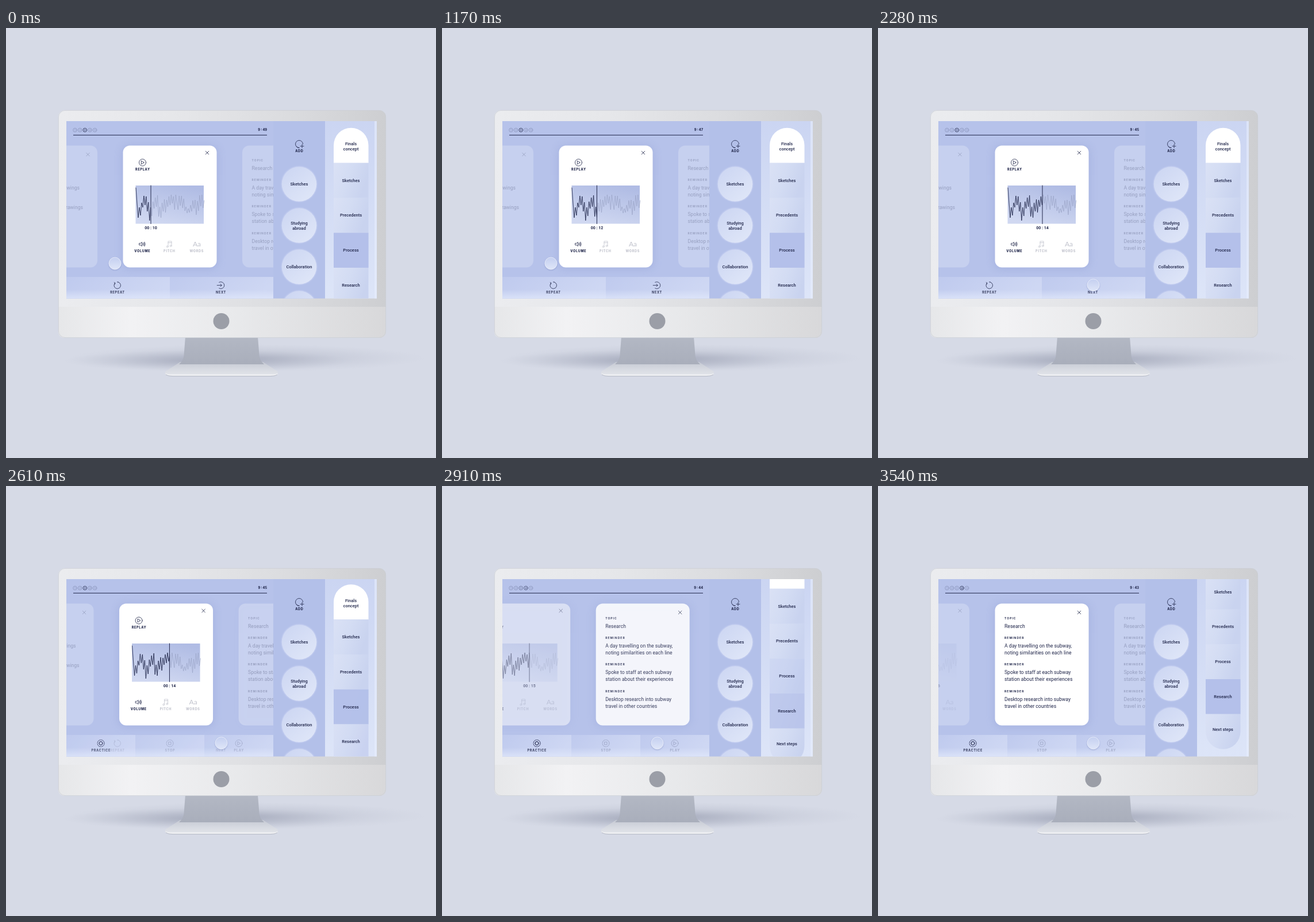
These frames come from a looping animation (748x748 px, 3.57 s). An HTML page:

```html
<!DOCTYPE html>
<html lang="en">
<head>
<meta charset="utf-8">
<title>Rehearsal cards</title>
<style>
  html, body { margin: 0; width: 100%; height: 100%; overflow: hidden; background: #d6dae6; }
  svg { display: block; width: 100vw; height: 100vh; }
  text { font-family: Roboto, sans-serif; fill: #20264a; }
  .body { font-size: 8.65px; }
  .item { font-size: 7.5px; font-weight: 500; text-anchor: middle; }
  .cap { font: 800 5.5px Inter, sans-serif; letter-spacing: .7px; text-anchor: middle; }
  .head { font: 700 5px Inter, sans-serif; letter-spacing: 1.05px; }
  .num { font: 500 4.2px Roboto, sans-serif; text-anchor: middle; }
  .line { fill: none; stroke: #20264a; stroke-width: .8; stroke-linecap: round; stroke-linejoin: round; }
  .faint { opacity: .27; }
</style>
</head>
<body>
<svg viewBox="0 0 748 748">
  <defs>
    <linearGradient id="shell">
      <stop offset="0" stop-color="#ebecef"/><stop offset=".35" stop-color="#e6e7ea"/>
      <stop offset=".7" stop-color="#dbdcdf"/><stop offset="1" stop-color="#cdced1"/>
    </linearGradient>
    <linearGradient id="chin">
      <stop offset="0" stop-color="#e6e7e9"/><stop offset=".22" stop-color="#f2f2f4"/>
      <stop offset=".55" stop-color="#e8e9eb"/><stop offset="1" stop-color="#d8d8da"/>
    </linearGradient>
    <linearGradient id="neck" x2="0" y2="1">
      <stop offset="0" stop-color="#b3b8c4"/><stop offset="1" stop-color="#a9aebb"/>
    </linearGradient>
    <linearGradient id="foot" x2="0" y2="1">
      <stop offset="0" stop-color="#c6cad4"/><stop offset=".6" stop-color="#d9dce3"/><stop offset="1" stop-color="#e2e4e9"/>
    </linearGradient>
    <radialGradient id="shade">
      <stop offset="0" stop-color="#7f859b" stop-opacity=".6"/><stop offset=".5" stop-color="#8b91a6" stop-opacity=".3"/>
      <stop offset="1" stop-color="#a0a6b8" stop-opacity="0"/>
    </radialGradient>
    <linearGradient id="side" x2="0" y2="1"><stop stop-color="#cbd5f2"/><stop offset="1" stop-color="#dde5f8"/></linearGradient>
    <linearGradient id="cell" x2="1" y2=".35">
      <stop stop-color="#dae1f5"/><stop offset=".5" stop-color="#d3dcf3"/><stop offset="1" stop-color="#c9d3ef"/>
    </linearGradient>
    <linearGradient id="disc" x2=".8" y2="1"><stop stop-color="#cbd5f2"/><stop offset="1" stop-color="#dfe6f8"/></linearGradient>
    <linearGradient id="wave" x1=".3" y1="1" x2=".7" y2="0"><stop stop-color="#d0d8f1"/><stop offset="1" stop-color="#b0bce4"/></linearGradient>
    <linearGradient id="bar" x2="1" y2=".3"><stop stop-color="#bfcaee"/><stop offset="1" stop-color="#ced7f3"/></linearGradient>
    <linearGradient id="knob" x2="0" y2="1"><stop stop-color="#c4cff0"/><stop offset="1" stop-color="#dfe6f8"/></linearGradient>
    <linearGradient id="glow" x2="0" y2="1"><stop stop-color="#e3eafc" stop-opacity="0"/><stop offset="1" stop-color="#e3eafc" stop-opacity=".7"/></linearGradient>
    <filter id="soft" x="-30%" y="-30%" width="160%" height="160%"><feGaussianBlur stdDeviation="7"/></filter>
    <filter id="lift" x="-40%" y="-40%" width="180%" height="180%">
      <feDropShadow dx="0" dy="1" stdDeviation="1.2" flood-color="#6f7fb8" flood-opacity=".55"/>
    </filter>
    <clipPath id="screen"><rect x="105" y="162" width="540" height="308.5"/></clipPath>
    <clipPath id="main"><rect x="105" y="162" width="360" height="308.5"/></clipPath>
    <clipPath id="played"><rect id="playedBox" x="220" y="270" height="75"/></clipPath>
  </defs>

  <rect width="748" height="748" fill="#d6dae6"/>
  <ellipse cx="420" cy="574" rx="310" ry="24" fill="url(#shade)" opacity=".55"/>
  <ellipse cx="350" cy="579" rx="250" ry="19" fill="url(#shade)" opacity=".75"/>
  <path d="M303 581H447L472 597Q474 601 471 603Q468 605 460 605H290Q281 605 278 603Q275 601 278 597Z" fill="url(#foot)"/>
  <path d="M312 537H438L440.500 569Q441 578 449 585H301Q309 578 309.500 569Z" fill="url(#neck)"/>
  <path d="M277.500 600.500Q279 602.500 290 602.500H460Q471 602.500 473 600.500Q473 605.300 460 605.300H290Q278 605.300 277.500 600.500Z" fill="#f0f1f4"/>
  <path d="M278 603Q282 605.600 290 605.600H460Q468 605.600 472 603" fill="none" stroke="#a4a8b5" stroke-width=".7"/>
  <rect x="91" y="143" width="570" height="396" rx="12" fill="url(#shell)"/>
  <path d="M91 485H661V527Q661 539 649 539H103Q91 539 91 527Z" fill="url(#chin)"/>
  <rect x="91.400" y="143.400" width="569.200" height="395.200" rx="11.600" fill="none" stroke="#cbced5" stroke-width=".8"/>
  <circle cx="374.500" cy="510" r="14" fill="#9b9ea7"/>

  <g clip-path="url(#main)">
    <rect x="105" y="162" width="360" height="309" fill="#b6c2ea"/>
    <g id="pager"></g>
    <path d="M117 186.300H454" stroke="#20264a" stroke-width="1"/>
    <text id="clock" x="454" y="179" text-anchor="end" style="font:800 5.600px Inter,sans-serif"></text>
    <g id="cards"></g>
    <g id="barOld"></g>
    <g id="barNew"></g>
    <rect x="105" y="455" width="360" height="16" fill="url(#glow)"/>
  </g>

  <g clip-path="url(#screen)">
    <rect x="465" y="162" width="90" height="309" fill="#b3c0e9"/>
    <path d="M510 208.500A6.500 6.500 0 1 1 516.500 202M510 208.500A6.500 6.500 0 0 1 505 206M512 205.500h6M515 202.500v6" class="line"/>
    <text x="510.300" y="216.300" class="cap">ADD</text>
    <g id="discs"></g>
    <rect x="555" y="162" width="90" height="309" fill="url(#side)"/>
    <g id="list"></g>
    <rect x="641" y="162" width="4" height="309" fill="#e8eefd" opacity=".6"/>
  </g>
  <circle id="ball" r="10.500" fill="url(#knob)" stroke="#eef2fd" stroke-width=".8" filter="url(#lift)"/>
</svg>

<script>
const LOOP = 3570, STEP = 30, GAP = 207.5, CELL = 60.75;
const $ = id => document.getElementById(id);
const lerp = (a, b, k) => a + (b - a) * k;
const clamp = v => Math.min(1, Math.max(0, v));
const inOut = u => u < .5 ? 4 * u ** 3 : 1 - 4 * (1 - u) ** 3;
const span = (t, from, length) => clamp((t - from) / length);

const text = (cls, x, y, s, extra = '') => `<text class="${cls}" x="${x}" y="${y}" ${extra}>${s}</text>`;
const line = (d, cls = '') => `<path class="line ${cls}" d="${d}"/>`;
const ring = (x, y, r, extra = '') => `<circle class="line" cx="${x}" cy="${y}" r="${r}" ${extra}/>`;
const cross = y => line(`M347.200 ${y - 2.8}l5.600 5.600m0 -5.600l-5.600 5.600`);
const at = (x, y, s) => `<g transform="translate(${x} ${y})">${s}</g>`;

const icons = {
  play: ring(0, 0, 6) + line('M-1.800 -2.800L2.800 0L-1.800 2.800Z'),
  repeat: line('M-4 -4.200A5.800 5.800 0 1 0 0 -5.800M-5.500 -5L-4 -4.200L-4.200 -2M1 -5.800h.1'),
  next: line('M-3 -5.200A6 6 0 1 1 -3 5.200M-6.500 0H1.500M-.7 -2.200L1.500 0L-.7 2.200'),
  practice: ring(0, 0, 6, 'stroke-dasharray="8 1.400"') + ring(0, 0, 3) + line('M-2.600 -1.500L0 -3.400L2.600 -1.500V1.500L0 3.400L-2.600 1.500Z'),
  stop: ring(0, 0, 6, 'stroke-dasharray="8 1.400"') + line('M-2 -2.300H2V2.300H-2Z'),
  volume: line('M-5 -1.500H-3L-.5 -3.500V3.500L-3 1.500H-5ZM1.300 -1.500Q2.300 0 1.300 1.500M2.700 -2.800Q4.500 0 2.700 2.800M4 -3.800Q6.500 0 4 3.800'),
  notes: line('M-2 4V-5H4V2.500M-2 -2.500H4') + ring(-3.4, 4.3, 1.4) + ring(2.6, 3, 1.4)
};

// Cards
const levels = [278, 305, 330, 312, 326, 304, 312, 292, 308, 293, 319, 303, 335, 312, 327, 302, 314, 295, 311, 291,
  328, 311, 330, 304, 319, 298, 321, 299, 311, 293, 308, 290, 305, 293, 316, 290, 303, 316, 292, 309,
  292, 313, 297, 318, 311, 322, 314, 321, 308, 319, 300, 314, 299, 325, 301, 318, 291, 310, 290, 313, 300];
const wave = 'M' + levels.map((y, i) => `${226 + i * 1.98} ${y}`).join('L');

const waveCard = cross(217) + at(237.5, 234, icons.play) + text('cap', 238, 248, 'REPLAY') +
  '<rect x="225.500" y="274" width="118.500" height="66.500" fill="url(#wave)"/>' +
  `<path d="${wave}" class="line" style="stroke:#9aa4c6;stroke-width:.7"/>` +
  `<path d="${wave}" class="line" clip-path="url(#played)"/>` +
  '<path id="head" class="line" style="stroke-width:1" d="M0 274V340.500"/>' +
  '<text id="elapsed" y="349.700" text-anchor="middle" style="font-size:7px;font-weight:600"></text>' +
  at(237, 376, icons.volume) + text('cap', 237.3, 389.8, 'VOLUME') +
  `<g class="faint">${at(284, 376, icons.notes)}${text('cap', 284.3, 389.8, 'PITCH')}
   ${text('', 332, 380.3, 'Aa', 'text-anchor="middle" style="font:400 12px Lato,sans-serif"')}${text('cap', 331.8, 389.8, 'WORDS')}</g>`;

const notes = [
  ['TOPIC', 231.8, ['Research']],
  ['REMINDER', 266, ['A day travelling on the subway,', 'noting similarities on each line']],
  ['REMINDER', 312.4, ['Spoke to staff at each subway', 'station about their experiences']],
  ['REMINDER', 358.8, ['Desktop research into subway', 'travel in other countries']]
];
const noteCard = cross(220) + notes.map(([head, y, rows]) =>
  text('head', 220, y, head) + rows.map((r, i) => text('body', 220, y + 14.8 + i * 12.1, r)).join('')).join('');

const pastCard = cross(220) + text('body', 335.5, 281, 'Concept drawings', 'text-anchor="end"') +
  text('body', 341.5, 315, 'Process drawings', 'text-anchor="end"');

$('cards').innerHTML = [pastCard, waveCard, noteCard, noteCard].map(body => `<g>
  <rect x="201" y="204" width="168" height="216" rx="14" fill="#8796cf" filter="url(#soft)"/>
  <rect x="203.500" y="204.500" width="163" height="212" rx="12" fill="#fff"/><g>${body}</g></g>`).join('');
const cards = [...$('cards').children];

// Pager and button bars
$('pager').innerHTML = [1, 2, 3, 4, 5].map((n, i) =>
  `<g>${ring(120 + i * 8.65, 177.5, 3.3)}${text('num', 120 + i * 8.65, 179, n)}</g>`).join('');
const dots = [...$('pager').children];

const bar = buttons => buttons.map(([label, icon, cls], i) => {
  const w = 360 / buttons.length, x = 105 + i * w, mid = x + w / 2 - (buttons.length < 3 ? 1.3 : 0);
  return `<rect x="${x}" y="433" width="${w}" height="38" fill="url(#bar)"/>
    <g class="${cls || ''}">${at(mid, 447.6, icons[icon])}${text('cap', mid + .3, 462, label)}</g>`;
}).join('');
$('barOld').innerHTML = bar([['REPEAT', 'repeat'], ['NEXT', 'next']]);
$('barNew').innerHTML = bar([['PRACTICE', 'practice'], ['STOP', 'stop', 'faint'], ['PLAY', 'play', 'faint']]);

// Right-hand columns
const label = (x, y, words) => words.map((w, i) =>
  text('item', x, y + 2.5 + (i - (words.length - 1) / 2) * 9, w)).join('');

$('discs').innerHTML = [['Sketches'], ['Studying', 'abroad'], ['Collaboration'], []].map((words, i) => {
  const y = 271.5 + i * 72;
  return `<circle cx="510" cy="${y}" r="32" fill="#cbd5f2" opacity=".35"/>
    <circle cx="510" cy="${y}" r="30.300" fill="url(#disc)"/>${label(510, y, words)}`;
}).join('');

const topics = [['Finals', 'concept'], ['Sketches'], ['Precedents'], ['Process'], ['Research'], ['Next steps']];
$('list').innerHTML = topics.map((words, i) => {
  const y = 174 + i * CELL, b = y + CELL;
  const shape = i === 0 ? `M570 ${b}V${y + 30}a30.250 30.250 0 0 1 60.500 0V${b}Z`
    : i === 5 ? `M570 ${y}H630.500V${b - 30}a30.250 30.250 0 0 1 -60.500 0Z`
    : `M570 ${y}H630.500V${b}H570Z`;
  const nudge = i === 0 ? 1.8 : i === 5 ? -4 : 0;
  return `<path d="${shape}" fill="${i ? 'url(#cell)' : '#fff'}"/>
    <path class="mark" d="${shape}" fill="#b4c0ea" opacity="0"/>${label(600, y + CELL / 2 + nudge, words)}`;
}).join('');
const marks = document.querySelectorAll('.mark');

function draw(t) {
  const slide = inOut(span(t, 2452, 798));
  const swap = span(t, 2400, 250);
  const move = inOut(span(t, 1495, 659));
  const ticks = Math.floor((t + 240) / 600);
  const head = 252 + t * .0149;

  $('clock').textContent = `9 : ${49 - ticks}`;
  $('elapsed').textContent = `00 : ${10 + ticks}`;
  $('elapsed').setAttribute('x', head);
  $('head').setAttribute('transform', `translate(${head})`);
  $('playedBox').setAttribute('width', head - 220);

  cards.forEach((card, i) => {
    const offset = i - 1 - slide, active = clamp(1.2 * (1 - Math.abs(offset)));
    const [shadow, face, body] = card.children;
    card.setAttribute('transform', `translate(${offset * GAP})`);
    shadow.setAttribute('opacity', .3 * active);
    face.setAttribute('opacity', lerp(.22, 1, active));
    body.setAttribute('opacity', lerp(.28, 1, active));
  });
  dots.forEach((dot, i) => dot.setAttribute('opacity', lerp(.3, 1, clamp(1 - Math.abs(i - 2 - slide)))));

  $('barOld').setAttribute('opacity', swap < 1 ? 1 : 0);
  $('barNew').setAttribute('opacity', swap);

  $('list').setAttribute('transform', `translate(0 ${-81 * slide})`);
  marks[3].setAttribute('opacity', 1 - slide);
  marks[4].setAttribute('opacity', slide);

  const x = lerp(189.5, 374.5, move), y = lerp(409.5, 447.2, move ** 2.23);
  $('ball').setAttribute('transform', `translate(${x} ${y})`);
}

const start = performance.now();
function tick() {
  const t = (performance.now() - start) % LOOP;
  draw(Math.floor(t / STEP) * STEP);
  requestAnimationFrame(tick);
}
tick();
</script>
</body>
</html>
```
